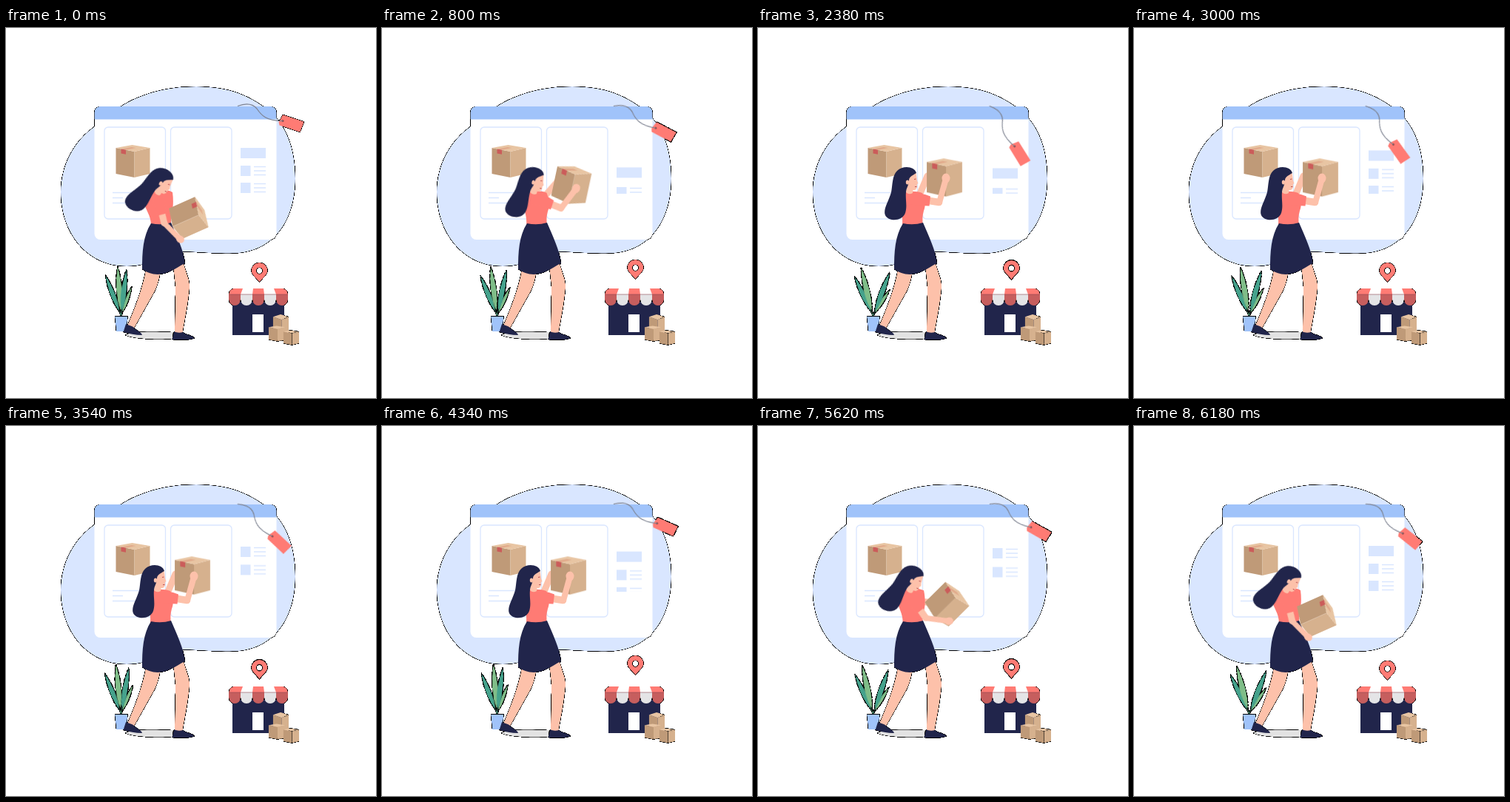
Animation, 500 px wide and 500 px high, one loop 6.2 s. Source, as an HTML page without scripts:

```html
<!DOCTYPE html>
<html lang="en">
<head>
<meta charset="utf-8">
<title>Shop window</title>
<style>
html, body { margin: 0; width: 100%; height: 100%; overflow: hidden; background: #fff; }
svg { display: block; width: 100vw; height: 100vh; }

:root { --loop: 6.2s; --sine: cubic-bezier(.37, 0, .63, 1); }
.sky { fill: #d9e6ff; }
.blue { fill: #a0c3fa; }
.navy { fill: #21254b; }
.red { fill: #ff7b74; }
.skin { fill: #fdc1aa; }
.limb { fill: none; stroke: #fdc1aa; stroke-linecap: round; stroke-linejoin: round; }
.rule { fill: none; stroke: #d9e6ff; stroke-width: 1.3; }

/* price tag */
.tag { transform-origin: 313px 105px; animation: tag var(--loop) var(--sine) infinite; }
@keyframes tag {
  0%, 80% { transform: rotate(0deg); }
  40% { transform: rotate(40deg); }
  80% { animation-timing-function: cubic-bezier(.47, 0, .745, .715); }
  100% { transform: rotate(20deg); }
}

/* map pin */
.pin { animation: pin calc(var(--loop) / 2) var(--sine) infinite; }
@keyframes pin { 50% { transform: translateY(-7.7px); } }

/* plant */
.leaf { animation: sway var(--loop) var(--sine) infinite; }
@keyframes sway {
  0%, 66.667% { transform: rotate(var(--a)); }
  33.333%, 100% { transform: rotate(var(--b)); }
}

/* sidebar list */
.item { animation: calc(var(--loop) / 3) var(--sine) infinite; }
.title { animation-name: title; }
.row1 { animation-name: row1; }
.row2 { animation-name: row2; }
@keyframes title {
  0%, 5%, 48.5%, 97%, 100% { transform: translateY(0); }
  27% { transform: translateY(62px); }
  60%, 80% { transform: translateY(-20px); }
}
@keyframes row1 {
  0%, 5%, 48.5%, 83%, 100% { transform: translateY(0); }
  27% { transform: translateY(68px); }
  60% { transform: translateY(-45px); }
}
@keyframes row2 {
  0%, 5%, 48.5%, 79%, 100% { transform: translateY(0); }
  27% { transform: translateY(72px); }
  60% { transform: translateY(-62px); }
}

/* woman: low pose, lift, hold, lower again */
.turn { animation: turn var(--loop) var(--sine) infinite; }
.shoulder { transform-origin: 207px 228px; }
.elbow { transform-origin: 246px 236px; }
@keyframes turn {
  0%, 97.5%, 100% { transform: rotate(var(--r)) scale(var(--s, 1)); }
  18%, 79.5% { transform: rotate(0deg) scale(1); }
}
.head { transform-origin: 205px 220px; animation: head var(--loop) var(--sine) infinite; }
@keyframes head {
  0%, 97.5%, 100% { transform: translate(1px, 1.5px) rotate(30deg); }
  22%, 75% { transform: translate(0px, 0px) rotate(0deg); }
}
.shirt { animation: shirt var(--loop) var(--sine) infinite; }
@keyframes shirt {
  0%, 97.5%, 100% { d: path("M194 222 C201 218 216 217 225 222 C227 236 225 248 224 253 C223 258 223 262 223 267 L196 267 C196 252 188 246 187 236 Z"); }
  18%, 79.5% { d: path("M197 223 C203 220 214 220 222 223 C226 232 227 240 224 247 C222 254 222 260 223 267 L195 267 C196 254 193 248 193 240 Z"); }
}
</style>
</head>
<body>
<svg viewBox="0 0 500 500">
  <defs>
    <!-- thin dark rim on the outer silhouette -->
    <filter id="rim" x="0" y="0" width="500" height="500" filterUnits="userSpaceOnUse" color-interpolation-filters="sRGB">
      <feColorMatrix in="SourceGraphic" values="0 0 0 0 0  0 0 0 0 0  0 0 0 0 0  0 0 0 20 -2" result="dark"/>
      <feColorMatrix in="SourceGraphic" values="1 0 0 0 0  0 1 0 0 0  0 0 1 0 0  0 0 0 2.5 -1.5" result="core"/>
      <feMerge><feMergeNode in="dark"/><feMergeNode in="core"/></feMerge>
    </filter>
    <clipPath id="list"><rect x="312" y="162" width="44" height="62"/></clipPath>
    <g id="crate">
      <path fill="#bf9a78" d="M-23-18 2-13V22L-23 17Z"/>
      <path fill="#d6b18e" d="M2-13 23-18V17L2 22Z"/>
      <path fill="#e8c5a3" d="M-23-18-1-22 23-18 2-13Z"/>
    </g>
    <g id="box">
      <use href="#crate"/>
      <path fill="#d98f74" d="M-16-16.6-9.5-15.3 4-18-2-19Z" opacity=".5"/>
      <path fill="#cb5c5a" d="M-16-16.6l6.5 1.3v6l-6.5-1.2z"/>
    </g>
    <path id="leaf" d="M-.6 0V-8C-5.500-25-5-48 0-68 5-48 5.500-25 .6-8V0Z"/>
    <g id="row">
      <rect class="sky" x="317" width="13.5" height="14"/>
      <path class="rule" d="M335 1.5h16M335 7h16M335 12.5h16"/>
    </g>
    <path id="flap" d="M0 360h16v7a8 8 0 0 1-16 0z"/>
  </defs>

  <g filter="url(#rim)">
    <path class="sky" d="M257 79C305 79 330 93 352 109 380 130 391 165 391 203 391 260 362 303 308 304.500 280 305.500 262 302.500 238 302.500 215 302.500 200 322 163 322 108 322 74 275 74 222 74 185 92 152 121 132 132 124 140 115 155 106 180 90 215 79 257 79Z"/>

    <!-- browser window -->
    <rect x="119.500" y="106" width="246" height="180" rx="8" fill="#fff"/>
    <path class="blue" d="M119.500 123.500V114a8 8 0 0 1 8-8h230a8 8 0 0 1 8 8v9.500z"/>
    <rect class="rule" x="133" y="134" width="82.500" height="124" rx="5"/>
    <rect class="rule" x="222.500" y="134" width="82.500" height="124" rx="5"/>
    <path class="rule" d="M144 222.500h49M144 229.500h14M144 236.500h36"/>
    <use href="#box" x="171.500" y="180"/>
    <g clip-path="url(#list)">
      <rect class="sky item title" x="317" y="162" width="34" height="14"/>
      <g class="item row1"><use href="#row" y="186"/></g>
      <g class="item row2"><use href="#row" y="209"/></g>
    </g>

    <g class="tag">
      <path class="red" d="M374 117 403 126.500 397.500 141 369.500 131.500 368.500 127Z"/>
      <circle cx="374" cy="125.500" r="1.500" fill="#8a4a4e"/>
      <path d="M313 105.500C325 101 333 102 339 109 345 118 352 126 374 125.500" fill="none" stroke="#7d8290" stroke-width="1.200"/>
    </g>

    <!-- plant -->
    <g transform="translate(155.500 389)">
      <g class="leaf" style="--a:-21deg;--b:-25.500deg"><use href="#leaf" transform="scale(.88)" fill="#45a28c"/></g>
      <g class="leaf" style="--a:20deg;--b:33deg"><use href="#leaf" transform="scale(.63)" fill="#7fbd88"/></g>
      <g class="leaf" style="--a:-4deg;--b:-14.500deg"><use href="#leaf" fill="#7fbd88"/></g>
      <g class="leaf" style="--a:6.700deg;--b:21.700deg"><use href="#leaf" transform="scale(.94)" fill="#45a28c"/></g>
    </g>
    <path class="blue" d="M147 389.500h17.500L162.500 410h-13.500z"/>

    <!-- shop -->
    <rect class="navy" x="306" y="370" width="70" height="45"/>
    <rect x="333" y="387" width="15" height="24" fill="#fff"/>
    <g fill="#c65e5e">
      <use href="#flap" x="301"/><use href="#flap" x="333"/><use href="#flap" x="365"/>
    </g>
    <g fill="#e4e4e6">
      <use href="#flap" x="317"/><use href="#flap" x="349"/>
    </g>
    <path class="red" d="M307 352h68q6 2 6 8h-80q0-6 6-8z"/>
    <path fill="#fff" d="M320 352h14l-1 8h-16zM348 352h14l3 8h-16z"/>
    <path d="M301 360h80" stroke="#8c4650" stroke-width=".6"/>
    <use href="#crate" transform="translate(371.500 405) scale(.46 .820)"/>
    <use href="#crate" transform="translate(366 413) scale(.48)"/>
    <use href="#crate" transform="translate(385.500 418.500) scale(.46)"/>
    <path class="red pin" fill-rule="evenodd" d="M342.500 344C338 337 331.500 334 331.500 328a11 11 0 0 1 22 0C353.500 334 347 337 342.500 344ZM342.500 323.800a4.200 4.200 0 1 0 .01 0Z"/>

    <!-- legs -->
    <path fill="#e2e2e2" d="M161 415C170 409 200 410 226 411L225 420C205 422 170 420 161 415Z"/>
    <path class="skin" d="M189 326 209 328C207 340 205 348 201 356L173 406 164 402C173 380 184 354 189 326Z"/>
    <path class="skin" d="M226 322 240 318 247 340Q248.500 346 248 352C246 374 242 392 238.500 413L228 412C228 392 229 368 229 350Z"/>
    <path class="navy" d="M162 400C166 402 170 402 173 405 177 409 183 411 184 415 175 415 166 413 158.500 411Z"/>
    <path class="navy" d="M227 410C231 412 235 412 239 411 244 415 253 415 255 419.500 246 422 234 422 224.500 421Z"/>

    <!-- upper body -->
    <g class="turn shoulder" style="--r:100deg">
      <path class="limb" stroke-width="9" d="M218 226 229 200"/>
    </g>
    <path class="red shirt" d="M197 223 C203 220 214 220 222 223 C226 232 227 240 224 247 C222 254 222 260 223 267 L195 267 C196 254 193 248 193 240 Z"/>
    <path class="navy" d="M196 264Q210 267 223 263C231 282 240 300 242 318 229 324 220 333 205 333 197 333 190 330 184 326 184 303 185 281 196 264Z"/>
    <g class="turn shoulder" style="--r:66deg;--s:.94">
      <use href="#box" transform="translate(252 202) scale(1.040 1.170)"/>
    </g>
    <g class="turn shoulder" style="--r:68deg;--s:.94">
      <g class="turn elbow" style="--r:52deg">
        <path class="limb" stroke-width="8" d="M245 236 253 207"/>
        <ellipse class="skin" cx="254" cy="203" rx="5.500" ry="6.500"/>
      </g>
      <path class="limb" stroke-width="9.500" d="M222 232 244.500 235.500"/>
      <path class="red" d="M204 222Q219 222 233 227.500L231.500 240.500Q217 240 204 238Z"/>
    </g>
    <g class="head">
      <path class="skin" d="M201 196H213.500C214.500 200 214.500 203 215 206L216.500 210 215 211C215.500 216 214 219.500 209.500 219L209 223Q204 226 200 222Z"/>
      <path class="navy" d="M214 196C212 187 196 185 188 193 181 200 182 212 180 222 176 236 168 246 172.500 254 178 262 195 261 199 250 202 240 199 232 200 222 200 216 204 213 204 206 204 201 209 199 214 196Z"/>
      <ellipse class="skin" cx="202" cy="208.500" rx="2.200" ry="3"/>
      <path d="M211 204.500l2.500-.5M212 214.500h2.500" fill="none" stroke="#b5484f" stroke-width=".9"/>
    </g>
  </g>
</svg>
</body>
</html>
```
